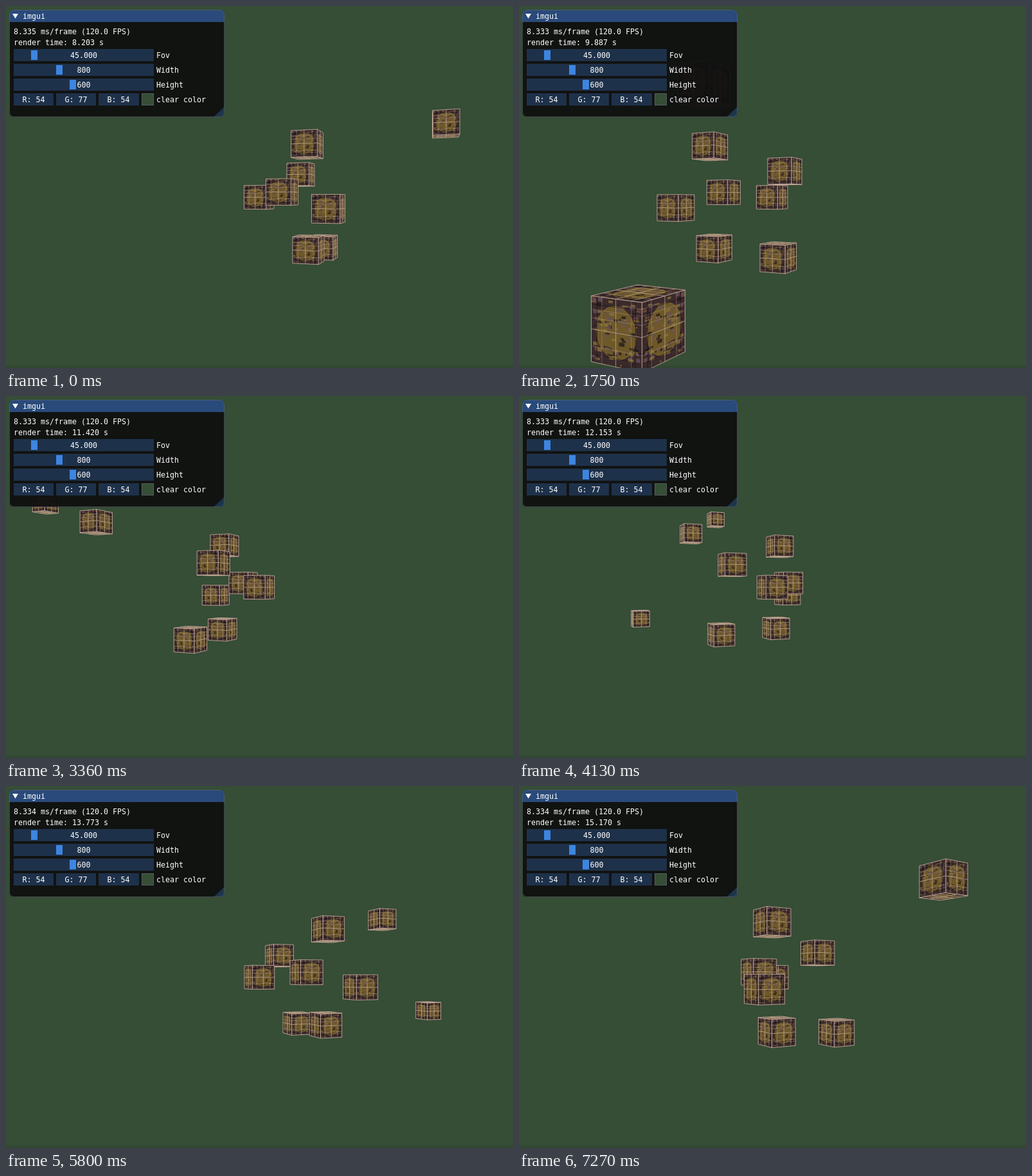
Animation of 789 by 564 pixels, one loop 7.34 s. Source, as an HTML page with a canvas:

```html
<!DOCTYPE html>
<html lang="en">
<head>
<meta charset="utf-8">
<title>Orbiting crates</title>
<style>
html, body { margin: 0; width: 100%; height: 100%; overflow: hidden; background: #364d36 }
canvas { display: block }
</style>
</head>
<body>
<canvas id="stage" width="789" height="564"></canvas>
<script>
const ctx = document.getElementById('stage').getContext('2d');
const LOOP = 7340, FOCAL = 300 / Math.tan(Math.PI / 8), RADIUS = 20, CX = 394, CY = 298;
const CLEAR = '#364d36';

const crates = [
  [0, 0, 0], [2, 5, -15], [-1.5, -2.2, -2.5], [-3.8, -2, -12.3], [2.4, -.4, -3.5],
  [-1.7, 3, -7.5], [1.3, -2, -2.5], [1.5, 2, -2.5], [1.5, .2, -1.5], [-1.3, 1, -1.5]
];

// Render clock: [step, seconds]
const clock = [[0, 8.203], [16, 9.287], [37, 10.686], [59, 12.153], [75, 13.236], [92, 14.378], [104, 15.17]];
// Start of each run of 11 steps, in ms
const runs = [70, 830, 1610, 2380, 3150, 3920, 4680, 5450, 6220, 6990];

function stepAt(ms) {
  const k = runs.findLastIndex(start => ms >= start);
  return k < 0 ? 0 : Math.min(104, 1 + 11 * k + Math.min(10, Math.floor((ms - runs[k]) / 70)));
}

function secondsAt(step) {
  const i = Math.max(1, clock.findIndex(([s]) => s >= step));
  const [s0, t0] = clock[i - 1], [s1, t1] = clock[i];
  return t0 + (t1 - t0) * (step - s0) / (s1 - s0);
}

let seed = 7;
const rand = () => (seed = seed * 16807 % 2147483647) / 2147483647;

// Wood grain shared by every face, as [u, v, width, height] grouped by colour
const grain = ['#20181c', '#765447', '#66505b', '#8a7335'].map(color => ({
  color,
  bits: Array.from({ length: 26 }, () => {
    const w = .03 + rand() * .08, h = .02 + rand() * .04;
    return [rand() * (1 - w), rand() * (1 - h), w, h];
  })
}));
const disc = Array.from({ length: 28 }, (_, i) => {
  const a = i * Math.PI / 14;
  return [.5 + .39 * Math.cos(a), .5 + .39 * Math.sin(a)];
});
const quad = (u, v, w, h) => [[u, v], [u + w, v], [u + w, v + h], [u, v + h]];
const square = quad(0, 0, 1, 1);

function trace(points, toScreen, closed = true) {
  points.forEach(([u, v], i) => ctx[i ? 'lineTo' : 'moveTo'](...toScreen(u, v)));
  if (closed) ctx.closePath();
}

function fillShape(points, toScreen, color) {
  ctx.fillStyle = color;
  ctx.beginPath();
  trace(points, toScreen);
  ctx.fill();
}

function drawFace(toScreen) {
  fillShape(square, toScreen, '#3b2a2c');
  fillShape(disc, toScreen, '#6d5828');
  for (const { color, bits } of grain) {
    ctx.fillStyle = color;
    ctx.globalAlpha = .75;
    ctx.beginPath();
    bits.forEach(b => trace(quad(...b), toScreen));
    ctx.fill();
  }
  ctx.globalAlpha = .75;
  ctx.strokeStyle = '#8d7434';
  ctx.lineWidth = 1;
  ctx.beginPath();
  trace(disc, toScreen);
  ctx.stroke();

  const rule = (alpha, ...lines) => {
    ctx.globalAlpha = alpha;
    ctx.beginPath();
    lines.forEach(l => trace(l, toScreen, false));
    ctx.stroke();
  };
  const across = v => [[0, v], [1, v]], down = u => [[u, 0], [u, 1]];
  ctx.strokeStyle = '#1b1417';
  rule(.7, across(.12), across(.88), down(.12), down(.88));
  ctx.strokeStyle = '#c9b09c';
  rule(.32, across(.24), across(.67), across(.8), down(.2), down(.78));
  rule(.7, across(.5), down(.5));
  rule(.85, [...square, square[0]]);
  ctx.globalAlpha = 1;
}

function drawCrates(time) {
  const s = Math.sin(time), c = Math.cos(time);
  const eye = [RADIUS * s, 0, RADIUS * c];
  const depth = p => RADIUS - p[0] * s - p[2] * c;
  const project = p => {
    const k = FOCAL / depth(p);
    return [CX + (p[0] * c - p[2] * s) * k, CY - p[1] * k];
  };
  const far = p => Math.hypot(...p.map((x, i) => x - eye[i]));

  for (const p of [...crates].sort((a, b) => far(b) - far(a))) {
    if (depth(p) < 1.5) continue;
    for (let axis = 0; axis < 3; axis++) {
      const toEye = eye[axis] - p[axis];
      if (Math.abs(toEye) <= .5) continue;
      const [a, b] = [[2, 1], [0, 2], [0, 1]][axis];
      drawFace((u, v) => {
        const q = [...p];
        q[axis] += Math.sign(toEye) / 2;
        q[a] += u - .5;
        q[b] += v - .5;
        return project(q);
      });
    }
  }
}

function box(x, y, w, h, color) {
  ctx.fillStyle = color;
  ctx.fillRect(x, y, w, h);
}

function text(str, x, mid, align = 'left') {
  ctx.fillStyle = '#fff';
  ctx.textAlign = align;
  ctx.fillText(str, x, mid + 4);
}

function triangle(color, ...points) {
  fillShape(points, (x, y) => [x, y], color);
}

function drawPanel(time, step) {
  const field = 'rgba(41,74,122,.54)', edge = 'rgba(110,110,128,.5)';
  ctx.font = '11.63px "DejaVu Sans Mono", monospace';
  ctx.save();
  ctx.beginPath();
  ctx.roundRect(5, 6, 335, 167, 7);
  ctx.clip();
  box(5, 6, 335, 167, 'rgba(15,15,15,.94)');
  box(5, 6, 335, 19, '#294a7a');
  triangle('rgba(66,150,250,.25)', [340, 157], [340, 173], [323, 173]);
  ctx.restore();
  ctx.strokeStyle = edge;
  ctx.lineWidth = 1;
  ctx.beginPath();
  ctx.roundRect(5.5, 6.5, 334, 166, 7);
  ctx.stroke();

  triangle('#fff', [10, 12], [19, 12], [14.5, 19.5]);
  text('imgui', 26, 16);
  const slow = step >= 72 && step < 80;
  const frame = slow ? '8.680' : step < 8 ? '8.335' : step < 72 ? '8.333' : '8.334';
  text(`${frame} ms/frame (${slow ? '115.2' : '120.0'} FPS)`, 12, 40);
  text(`render time: ${time.toFixed(3)} s`, 12, 57);

  [['45.000', 'Fov', 39], ['800', 'Width', 78], ['600', 'Height', 99]].forEach(([value, label, grab], i) => {
    const y = 67 + 23 * i;
    box(12, y, 218, 19, field);
    box(grab, y + 2, 10, 15, '#3d85e0');
    text(value, 121, y + 10, 'center');
    text(label, 234, y + 10);
  });
  ['R: 54', 'G: 77', 'B: 54'].forEach((value, i) => {
    box(12 + 66 * i, 136, i < 2 ? 62 : 63, 19, field);
    text(value, 43 + 66 * i, 146, 'center');
  });
  box(211, 136, 19, 19, CLEAR);
  ctx.strokeStyle = edge;
  ctx.strokeRect(211.5, 136.5, 18, 18);
  text('clear color', 234, 146);
}

function draw() {
  const step = stepAt(performance.now() % LOOP), time = secondsAt(step);
  box(0, 0, 789, 564, CLEAR);
  drawCrates(time);
  box(0, 560, 789, 4, 'rgba(0,0,0,.08)');
  drawPanel(time, step);
  requestAnimationFrame(draw);
}
draw();
</script>
</body>
</html>
```
